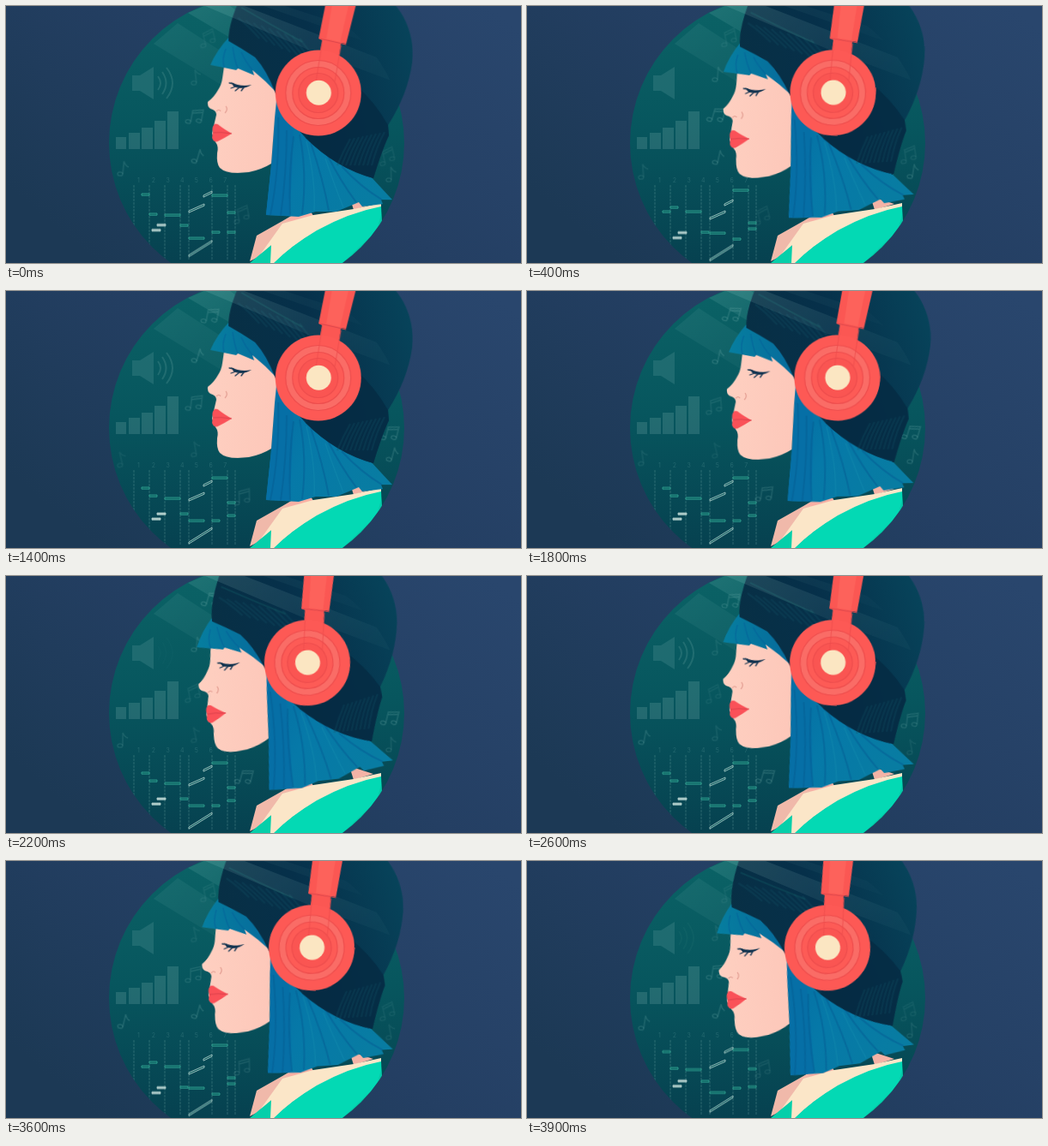
An HTML page that plays this animation: 600 px wide and 300 px high, repeating every 4 s.

```html
<!DOCTYPE html>
<html lang="en">
<head>
<meta charset="utf-8">
<title>Listening</title>
<style>
html, body { margin: 0; width: 100%; height: 100%; overflow: hidden; background: #203d60; }
svg { display: block; width: 600px; height: 300px; }
.nod { transform-origin: 356px 214px; animation: nod 4s infinite; }
@keyframes nod {
  0% { transform: rotate(.1deg); animation-timing-function: cubic-bezier(.45, 0, .62, .88); }
  17.5%, 57.5% { transform: rotate(-7deg); animation-timing-function: cubic-bezier(.35, .1, .47, 1); }
  37.5%, 77.5% { transform: rotate(.2deg); animation-timing-function: cubic-bezier(.53, 0, .65, .9); }
  97.5% { transform: rotate(-7deg); }
  100% { transform: rotate(-6.5deg); }
}
.bob { animation: bob 400ms ease-in-out infinite alternate; }
@keyframes bob {
  from { transform: translateY(calc(var(--a) * -1px)); }
  to { transform: translateY(calc(var(--a) * 1px)); }
}
.wave { animation: wave 4s linear infinite; }
@keyframes wave {
  0% { opacity: 1; }
  5%, 12.5%, 45%, 52.5%, 85%, 92.5% { opacity: 0; }
  17.5%, 57.5%, 97.5% { opacity: .25; }
  25%, 40%, 65%, 80%, 100% { opacity: 1; }
}
.float { animation: float 2s ease-in-out infinite alternate; }
@keyframes float {
  from { transform: translate(-2px, 5px) rotate(-14deg); opacity: .4; }
  to { transform: translate(2px, -5px) rotate(16deg); opacity: 1; }
}
text { font: 7px Inter, sans-serif; }
</style>
</head>
<body>
<svg viewBox="0 0 600 300">
  <defs>
    <linearGradient id="sky" x1="1" y1=".1" x2="0" y2=".7">
      <stop stop-color="#29466d"/><stop offset=".5" stop-color="#243f63"/><stop offset="1" stop-color="#1c3955"/>
    </linearGradient>
    <linearGradient id="disc" x2="0" y2="1">
      <stop stop-color="#0b6366"/><stop offset=".45" stop-color="#07565e"/><stop offset="1" stop-color="#063d4d"/>
    </linearGradient>
    <linearGradient id="hat" x1="0" y1=".6" x2="1" y2=".3">
      <stop stop-color="#082f44"/><stop offset=".5" stop-color="#06304a"/><stop offset="1" stop-color="#07435a"/>
    </linearGradient>
    <linearGradient id="hair" x2="1" y2=".6">
      <stop stop-color="#046ba2"/><stop offset=".5" stop-color="#0679a8"/><stop offset="1" stop-color="#087ca2"/>
    </linearGradient>
    <linearGradient id="bangs" x2="1">
      <stop stop-color="#067e9f"/><stop offset="1" stop-color="#066a9c"/>
    </linearGradient>
    <linearGradient id="skin" x2="1" y2=".2">
      <stop stop-color="#fed0c1"/><stop offset="1" stop-color="#fdc8ba"/>
    </linearGradient>
    <linearGradient id="beam" x2="1" y2=".5">
      <stop stop-color="#c9fff3" stop-opacity=".22"/><stop offset="1" stop-color="#c9fff3" stop-opacity=".05"/>
    </linearGradient>
    <clipPath id="round"><circle cx="292" cy="160" r="172"/></clipPath>
    <g id="pair" fill="none" stroke="#78b5b0" stroke-opacity=".26" stroke-width="1.3">
      <path d="M-5 6V-7L7-10V3M-5-4L7-7"/>
      <ellipse cx="-8" cy="6.500" rx="3" ry="2.200"/><ellipse cx="4" cy="3.500" rx="3" ry="2.200"/>
    </g>
    <g id="single" fill="none" stroke="#78b5b0" stroke-opacity=".26" stroke-width="1.3">
      <path d="M0 7V-8Q2-3 6-2"/><ellipse cx="-3" cy="7" rx="3" ry="2.200"/>
    </g>
  </defs>

  <rect width="600" height="300" fill="url(#sky)"/>
  <circle cx="292" cy="160" r="172" fill="url(#disc)"/>

  <g clip-path="url(#round)">
    <path d="M172 44L200 20L330 104L300 122Z" fill="url(#beam)" opacity=".3"/>
    <path d="M212 8L250-8L330 50L300 60Z" fill="url(#beam)" opacity=".5"/>
    <g fill="#8fc0bd">
      <path d="M147 81H156L172 71V109L156 99H147Z" fill-opacity=".16"/>
      <path d="M128 153h12v14h-12zM143 148h13v19h-13zM158 142h13v25h-13zM173 134h13v33h-13zM188 123h13v44h-13z" fill-opacity=".2"/>
    </g>
    <path class="wave" d="M177 82Q183 90 177 98M182 77Q191 90 182 103M187 72Q201 90 187 108" fill="none" stroke="#8fc0bd" stroke-opacity=".18" stroke-width="2"/>
    <g id="notes"></g>
    <g id="roll"></g>

    <path d="M284 298L292 268L322 251L351 234L358 245L330 262L300 290Z" fill="#f0b9aa"/>
    <path d="M326 250L351 234L358 245L338 252Z" fill="#f9b0a4"/>
    <path d="M400 222L428 231L405 238Z" fill="#f4b3a6"/>
    <path d="M284 300L309 279L310 300Z" fill="#06cfaa"/>
    <path d="M297 289L322 254L358 244L405 237L437 230V235Q400 242 362 263Q332 280 313 300H308L309 279Z" fill="#fbe6c8"/>
    <path d="M312 300Q332 280 362 262Q400 241 437 234L438 252L430 300Z" fill="#03d9b4"/>
    <path d="M437 244L432 262L392 300H405L438 268Z" fill="#08b99c" opacity=".5"/>
  </g>

  <g class="nod">
    <path d="M314 105L311 160L309 186L303 244L341 246L361 240L385 240L411 229L415 234L439 231L437 226L450 226L424 198L380 130Z" fill="url(#hair)"/>
    <path d="M314 104L311 160L309 186L303 244L330 245Q335 180 334 130Z" fill="#066fa6"/>
    <path d="M317 130Q319 190 308 244M327 145Q327 195 320 245M342 150Q351 195 345 243M355 160Q370 204 376 239M375 175Q390 205 408 229M335 152Q329 195 331 244M391 187Q413 211 438 226" fill="none" stroke="#066197" stroke-width="2" opacity=".6"/>
    <path d="M350 158Q361 205 359 239M372 178Q383 210 393 235" fill="none" stroke="#128aae" stroke-width="1.500" opacity=".5"/>
    <path d="M254 70L252 84Q251 92 247 98Q242 107 235 112Q234 117 238 120Q245 122 245 127L242 140L240 149L244 159Q248 164 246 172Q245 184 249 189Q255 195 270 195L283 194Q298 191 309 184L313 130L317 90L290 55Z" fill="url(#skin)"/>
    <path d="M243 138Q239 142 241 147L240 154Q242 160 247 158Q255 154 263 149Q254 144 249 140Q246 137 243 138Z" fill="#fa5158"/>
    <path d="M241 148Q250 147 263 149" fill="none" stroke="#d53e4a" stroke-width=".8"/>
    <path d="M245 123Q248 120 250 123M256 117Q259 121 255 125" fill="none" stroke="#e09a8e" stroke-width="1.100"/>
    <path d="M262 89Q273 95 286 92Q275 99 265 94Z" fill="#123450"/>
    <path d="M268 94L262 96M272 95L267 99M277 95L274 99M265 91L260 90" stroke="#123450" stroke-width="1.300" stroke-linecap="round"/>
    <path d="M260 36Q245 52 238 69L268 75L270 73L289 81L287 75L302 88L316 102L319 75Z" fill="url(#bangs)"/>
    <path d="M256 50Q251 62 254 72M264 48Q266 64 270 73M274 54Q278 64 287 75" fill="none" stroke="#06639a" stroke-width="1.500" opacity=".6"/>
    <path d="M259 41Q258 18 280-25H425Q451-9 463 13Q476 38 473 66Q468 103 445 139L446 151Q438 168 428 201Q384 189 349 154Q324 128 313 100Q304 76 290 60Q275 50 259 41Z" fill="url(#hat)"/>
    <path d="M406 91Q430 112 445 139L446 151Q438 168 428 201Q384 189 349 154Z" fill="#052a42" opacity=".75"/>
    <path d="M274 2Q310 23 345 42" fill="none" stroke="#0b4153" stroke-width="2"/>
    <g id="ribs" fill="none" stroke="#125064" stroke-width="2.200" opacity=".3"></g>
  </g>

  <g clip-path="url(#round)">
    <path d="M232 0H278L468 74L470 95L352 51Z" fill="url(#beam)" opacity=".55"/>
    <path d="M300 0H325L466 46L468 59Z" fill="url(#beam)" opacity=".2"/>
  </g>

  <g class="nod">
    <path d="M377-28H414L396 44L390 43L387 62L384 101H358L364 62L368 40L364 38Z" fill="#fb5753"/>
    <path d="M384-28H405L389 42L373 38Z" fill="#fd625b"/>
    <path d="M365 38L396 45" stroke="#dd484c" stroke-width="1.200"/>
    <circle cx="363.700" cy="101.500" r="50" fill="#fd5955"/>
    <g stroke="#ee4d4d" stroke-width="1.200">
      <circle cx="363.700" cy="101.500" r="38" fill="#fa6c66"/>
      <circle cx="363.700" cy="101.500" r="30" fill="#fd5b56"/>
      <circle cx="363.700" cy="101.500" r="23" fill="#fa5552"/>
      <path d="M368 44L361 88M390 46L383 88" fill="none" opacity=".7"/>
    </g>
    <circle cx="364.200" cy="101.200" r="14.500" fill="#fbe6c2"/>
  </g>
</svg>
<script>
const ns = 'http://www.w3.org/2000/svg';
const el = id => document.getElementById(id);
function add(parent, tag, attrs) {
  const node = document.createElementNS(ns, tag);
  for (const key in attrs) node.setAttribute(key, attrs[key]);
  return parent.appendChild(node);
}

// Floating music notes
[[238, 33, 'pair'], [222, 80, 'single'], [220, 133, 'pair'], [222, 180, 'single'],
 [136, 191, 'single'], [277, 240, 'pair'], [447, 171, 'pair'], [449, 195, 'single']
].forEach(([x, y, kind], i) => {
  const spot = add(el('notes'), 'g', { transform: `translate(${x} ${y})` });
  add(spot, 'use', { href: '#' + kind, class: 'float', style: `animation-delay:${-i * 700}ms` });
});

// Piano roll grid
const roll = el('roll');
[149, 167, 185, 203, 213, 240, 258, 267].forEach(x =>
  add(roll, 'path', { d: `M${x} 209V297`, stroke: '#8cc5bd', 'stroke-opacity': .28, 'stroke-dasharray': '3 1' }));
for (let i = 0; i < 7; i++) {
  add(roll, 'text', { x: 153 + i * 16.7, y: 206, fill: '#8cc5bd', 'fill-opacity': .22 }).textContent = i + 1;
}

// Notes: x, y, width, rise, swing, white
[[158, 230, 9, 0, 10, 0], [167, 239, 9, 0, -4, 0], [185, 242, 18, 0, -2, 0],
 [240, 218, 18, 0, -3, 0], [258, 247, 9, 0, 6, 0], [240, 268, 9, 0, 4, 0],
 [203, 260, 9, 0, 4, 0], [213, 268, 18, 0, -3, 0], [258, 262, 9, 0, -2, 0],
 [176, 260, 10, 0, 4.5, 1], [170, 266, 10, 0, 4.5, 1],
 [213, 244, 18, 8, 4, 1], [230, 227, 10, 5, 5, 1], [213, 294, 27, 17, 2.5, 1]
].forEach(([x, y, w, rise, swing, white]) =>
  add(roll, 'path', {
    d: `M${x} ${y - 1}l${w} ${-rise}v2.200l${-w} ${rise}z`,
    class: 'bob', style: `--a:${swing}`, 'stroke-width': .8,
    stroke: white ? '#b9d3d0' : '#35ab98', fill: white && !rise ? '#a9c8c5' : '#0b5d60'
  }));

// Knitted ribs on the hat
for (let i = 0; i < 9; i++) {
  add(el('ribs'), 'path', { d: `M${270 + i * 9} ${14 + i * 3}q12 ${9 + i} 25 ${24 + i}` });
  add(el('ribs'), 'path', { d: `M${441 - i * 5} ${147 + i}q-9 16 -15 ${39 - i}` });
}
</script>
</body>
</html>
```
